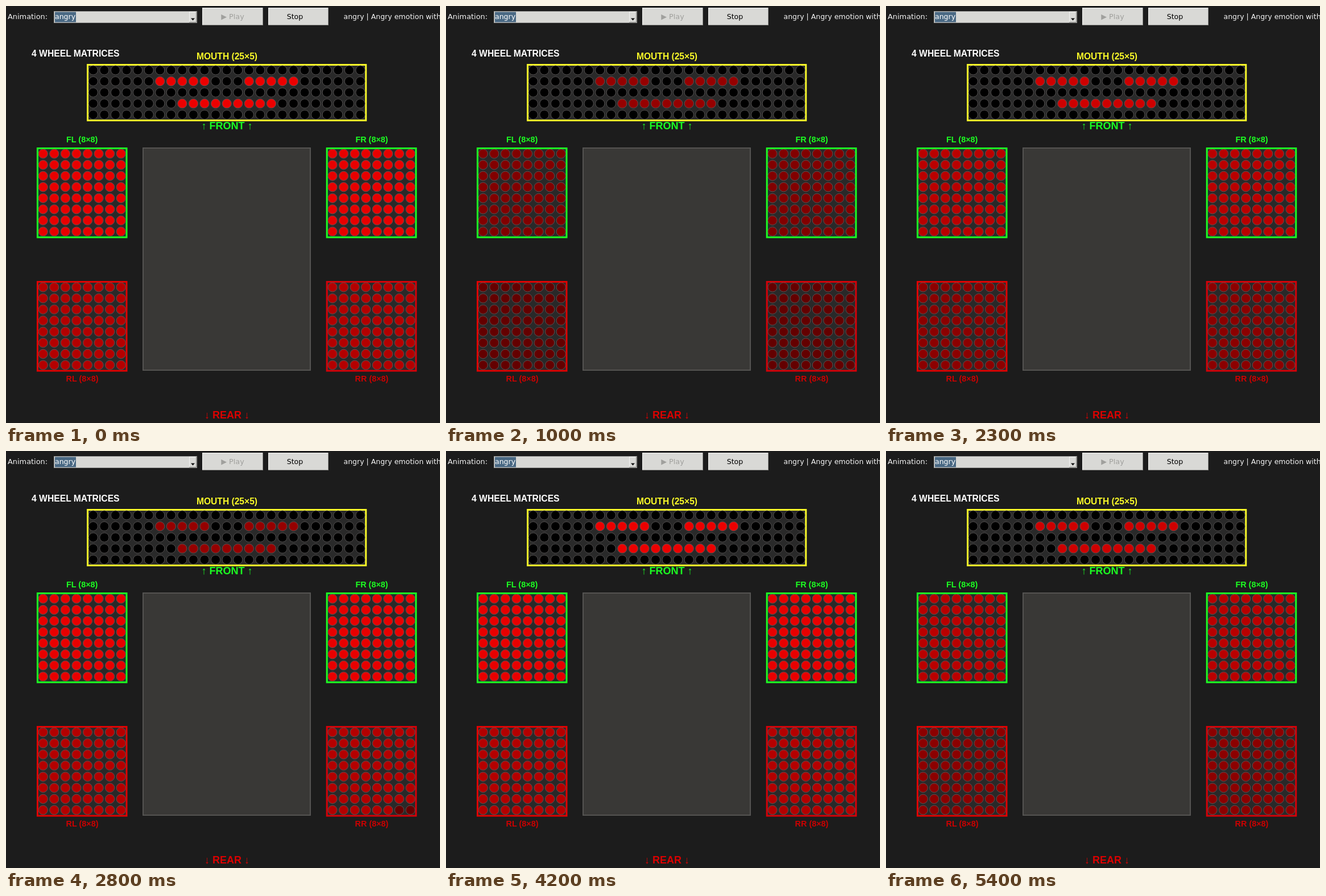
These frames come from a looping animation (763x734 px, 5.7 s). An HTML page:

```html
<!DOCTYPE html>
<html lang="en">
<head>
<meta charset="utf-8">
<title>Wheel matrices</title>
<style>
  html, body { margin: 0; width: 100%; height: 100%; overflow: hidden; background: #1c1c1c; }
  svg { display: block; width: 763px; height: 734px; }
  .ui { font: 12.5px "DejaVu Sans", sans-serif; }
  .label { font: bold 14.4px "Liberation Sans", Arial, sans-serif; }
  .mid { text-anchor: middle; }
</style>
</head>
<body>
<svg id="stage" viewBox="0 0 763 734"></svg>
<script>
const LOOP = 5700, TICK = 100, PITCH = 19.57;
const GREEN = '#1cff22', RED = '#e20000', YELLOW = '#fafa28';
const stage = document.getElementById('stage');

function add(tag, attrs, text) {
  const el = document.createElementNS('http://www.w3.org/2000/svg', tag);
  for (const key in attrs) el.setAttribute(key, attrs[key]);
  if (text) el.textContent = text;
  return stage.appendChild(el);
}
const rect = (x, y, width, height, fill, more) => add('rect', { x, y, width, height, fill, ...more });
const text = (x, y, str, fill, cls, size) =>
  add('text', { x, y, fill, class: cls, ...(size && { style: `font-size:${size}px` }) }, str);

function button(x, y, w, h) {
  rect(x, y, w, h, '#8f8f8c');
  rect(x, y, w - 1, h - 1, '#f2f2f0');
  rect(x + 1, y + 1, w - 2, h - 2, '#d9d9d6');
}

// Toolbar
text(3, 23, 'Animation:', '#f4f4f4', 'ui', 12.9);
rect(84, 9, 252, 21, '#9a9a98');
rect(85, 10, 250, 19, '#d8d8d5');
rect(86, 10.5, 37, 18, '#4a6984');
text(86, 23, 'angry', '#fff', 'ui');
button(322, 10, 13, 19);
add('path', { d: 'M325 21.5h7l-3.5 4z', fill: '#111' });
button(345, 3, 107, 31);
text(398.5, 23, '▶ Play', '#a0a09d', 'ui mid', 12.8);
button(461, 3, 106, 31);
text(508, 23, 'Stop', '#000', 'ui mid', 12.6);
text(593.5, 23, 'angry | Angry emotion with', '#f4f4f4', 'ui');

// Chassis and labels
rect(241, 250, 294, 391, '#393836', { stroke: '#555452', 'stroke-width': 2 });
text(45, 89, '4 WHEEL MATRICES', '#fff', 'label', 15.7);
text(388.5, 93.5, 'MOUTH (25×5)', YELLOW, 'label mid', 15.6);
text(388.5, 217, '↑ FRONT ↑', GREEN, 'label mid', 18);
text(388.5, 726, '↓ REAR ↓', '#dc0000', 'label mid', 18);

const dots = [];

function matrix(x, y, cols, rows, color, part, lit) {
  rect(x - 9.8, y - 9.5, (cols - 1) * PITCH + 19.6, (rows - 1) * PITCH + 19.6, '#292929',
    { stroke: color, 'stroke-width': 3 });
  for (let r = 0; r < rows; r++) {
    for (let c = 0; c < cols; c++) {
      const el = add('circle', {
        cx: x + c * PITCH, cy: y + r * PITCH, r: 8.1,
        fill: '#000', stroke: '#5c5858', 'stroke-width': 0.9
      });
      dots.push({ el, part, on: lit(r, c) });
    }
  }
}

const all = () => true;
const face = (r, c) =>
  (r === 1 && ((c >= 6 && c <= 10) || (c >= 14 && c <= 18))) ||
  (r === 3 && c >= 8 && c <= 16);

matrix(65.2, 260, 8, 8, GREEN, 'front', all);
matrix(574, 260, 8, 8, GREEN, 'front', all);
matrix(65.2, 495, 8, 8, RED, 'rear', all);
matrix(574, 495, 8, 8, '#d60008', 'rear', all);
matrix(153.3, 113, 25, 5, YELLOW, 'mouth', face);
text(133.7, 240, 'FL (8×8)', GREEN, 'label mid');
text(643, 240, 'FR (8×8)', GREEN, 'label mid');
text(134, 661, 'RL (8×8)', '#cc0000', 'label mid');
text(643, 661, 'RR (8×8)', '#cc0000', 'label mid');

// Red levels: bright, middle, dark
const LEVELS = {
  front: [232, 186, 130],
  rear: [180, 140, 100],
  mouth: [236, 206, 150]
};

// Start and end of each sweep; the level steps bright, middle, dark, bright...
const SWEEPS = [
  [-100, 0], [0, 300], [697, 1000], [1200, 1300], [1400, 1700], [2300, 2600], [2600, 2900],
  [3100, 3300], [3500, 3900], [4100, 4200], [4400, 4500], [4700, 4900], [5000, 5100], [5200, 5400]
];

function draw(ms) {
  const t = Math.floor((ms % LOOP) / TICK) * TICK;
  let i = SWEEPS.length - 1;
  while (SWEEPS[i][0] > t) i--;
  const [from, to] = SWEEPS[i];
  const done = Math.round(Math.min(1, (t - from) / (to - from)) * dots.length);
  dots.forEach(({ el, part, on }, n) => {
    if (!on) return;
    const level = (n < done ? i : i + 2) % 3;
    el.setAttribute('fill', `rgb(${LEVELS[part][level]},0,0)`);
  });
}

const start = performance.now();
function loop(now) {
  draw(Math.max(0, now - start));
  requestAnimationFrame(loop);
}
draw(0);
requestAnimationFrame(loop);
</script>
</body>
</html>
```
